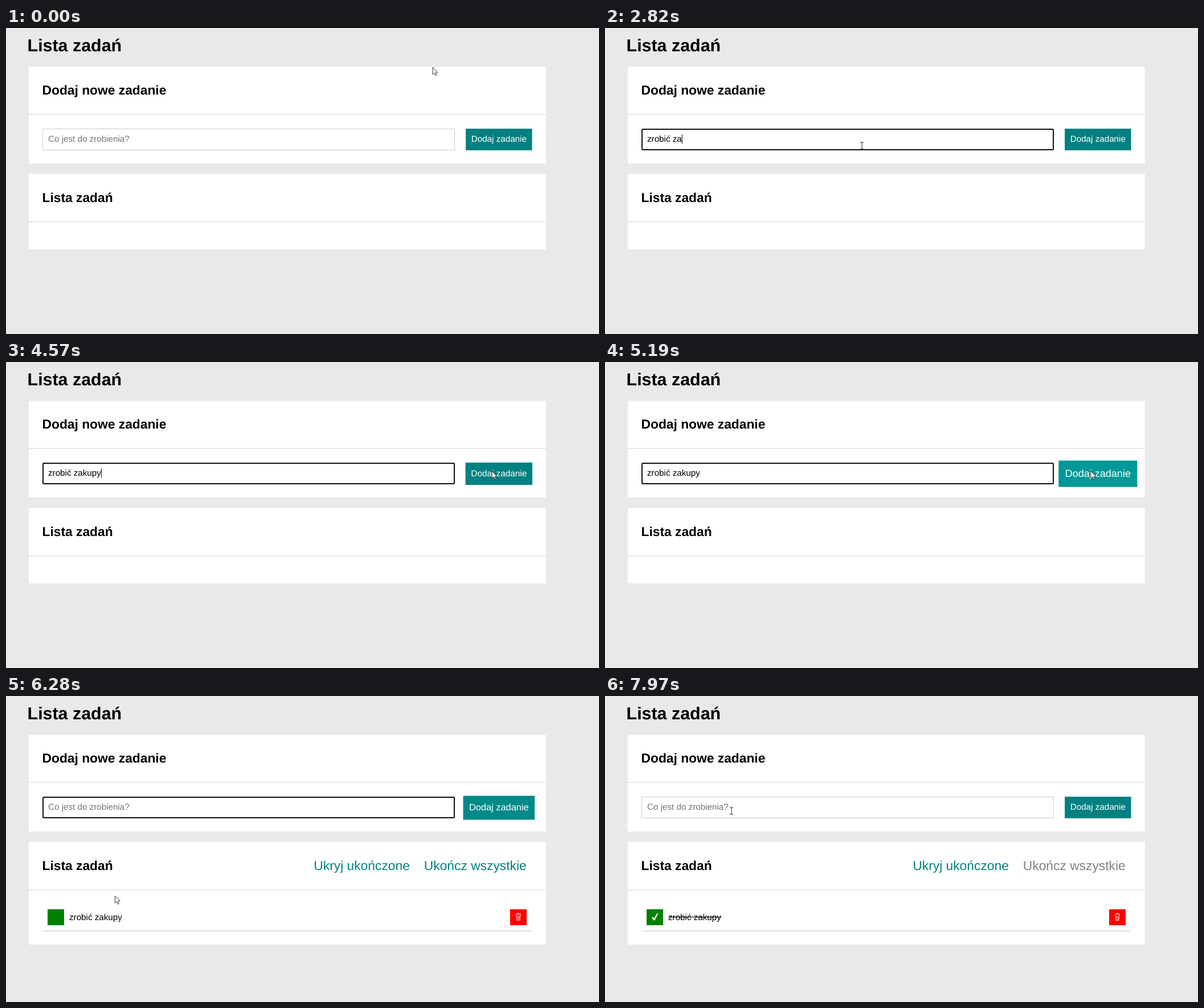
Recreate the animation shown at these times as an HTML page. Size 1041x538 px, loop 8 s.

```html
<!DOCTYPE html>
<html lang="pl">
<head>
<meta charset="utf-8">
<title>Lista zadań</title>
<style>
  html, body { margin: 0; width: 100%; height: 100%; overflow: hidden; background: #e9e9e9; }
  svg { display: block; width: 100%; height: 100%; }
  text { font: 15.2px "Liberation Sans", Arial, sans-serif; text-rendering: geometricPrecision; white-space: pre; }
  .h1 { font-size: 30.4px; font-weight: bold; }
  .h2 { font-size: 22.8px; font-weight: bold; }
  .link { font-size: 22.8px; fill: #008080; }
  .card { fill: #fff; }
  .line { fill: #e6e6e6; }
</style>
</head>
<body>
<svg viewBox="0 0 1041 538">
  <rect width="1041" height="538" fill="#e9e9e9"/>
  <text class="h1" x="37.6" y="41">Lista zadań</text>

  <rect class="card" x="40" y="68.4" width="907.8" height="169.8"/>
  <rect class="line" x="40" y="151" width="907.8" height="1.8"/>
  <text class="h2" x="63.5" y="117">Dodaj nowe zadanie</text>

  <rect id="box" fill="#fff"/>
  <text id="entry" x="74" y="200.2"></text>
  <rect id="caret" y="187" width="1" height="16.4"/>

  <g id="button">
    <rect id="buttonFill" x="-58.2" width="116.4"/>
    <text y="4.3" text-anchor="middle" fill="#fff">Dodaj zadanie</text>
  </g>

  <rect id="listCard" class="card" x="40" y="256.6" width="907.8"/>
  <rect class="line" x="40" y="340" width="907.8" height="1.8"/>
  <text class="h2" x="63.5" y="306">Lista zadań</text>

  <g id="task">
    <text class="link" x="540.3" y="306">Ukryj ukończone</text>
    <text id="finishAll" class="link" x="733.8" y="306">Ukończ wszystkie</text>
    <rect x="64" y="412.2" width="859.5" height="1.8" fill="#ddd"/>
    <rect id="toggle" x="73" y="375" width="29" height="28"/>
    <text x="111" y="393.8">zrobić zakupy</text>
    <g id="done">
      <path d="M82 389.4L84 388.2L86 391L91.4 382.2H93.4L87.4 394.6H85.6Z" fill="#fff"/>
      <rect x="111" y="388.2" width="93" height="1.1"/>
    </g>
    <rect x="885" y="375" width="29" height="28" fill="#f00"/>
    <path d="M895.6 384L896.8 394.5H901.9L903.1 384M898.2 386V393M900.5 386V393M895 383.3H903.8M897.5 382.2H901.2"
      fill="none" stroke="#ffe9e0"/>
  </g>

  <g id="pointer">
    <circle id="halo" r="9" fill="#ff0" fill-opacity=".5"/>
    <path id="arrow" d="M0 0V12.6L2.9 10L5 14.6L6.9 13.7L5 9.2H9Z" fill="#fff" stroke="#222" stroke-width=".9"/>
    <path id="beam" d="M-3 -6H3M0 -6V6M-3 6H3" fill="none" stroke="#222"/>
  </g>
</svg>
<script>
const LOOP = 8000;
const WORD = "zrobić zakupy";
const TYPE_START = 1420, KEY_GAP = 172;

// mouse button goes down on the field, the add button and the task's toggle
const PRESS = { field: 630, add: 5530, toggle: 6760 };
const HOLD = 130;
const ADDED = PRESS.add + HOLD, CHECKED = PRESS.toggle + HOLD;

// each move ends at x, y; bow bends its middle up or down
const REST = { x: 749, y: 69 };
const MOVES = [
  { from: 0, to: 490, x: 351, y: 197, bow: 0 },
  { from: 940, to: 1220, x: 451, y: 207, bow: 0 },
  { from: 4000, to: 4570, x: 853, y: 192, bow: -40 },
  { from: 5800, to: 6420, x: 94, y: 385, bow: -22 },
  { from: 7270, to: 7970, x: 222, y: 202, bow: 40 }
];

const el = {};
document.querySelectorAll("[id]").forEach(node => el[node.id] = node);

const clamp = v => Math.min(1, Math.max(0, v));
const smooth = k => k * k * (3 - 2 * k);
const set = (node, attrs) => { for (const k in attrs) node.setAttribute(k, attrs[k]); };
const show = (node, on) => set(node, { display: on ? "inline" : "none" });

// the CSS "ease" curve, cubic-bezier(.25, .1, .25, 1)
function ease(x) {
  x = clamp(x);
  if (x === 0 || x === 1) return x;
  const bezier = (u, a, b) => 3 * a * u * (1 - u) ** 2 + 3 * b * u * u * (1 - u) + u ** 3;
  let lo = 0, hi = 1;
  for (let i = 0; i < 24; i++) {
    const mid = (lo + hi) / 2;
    if (bezier(mid, .25, .25) < x) lo = mid; else hi = mid;
  }
  return bezier(lo, .1, 1);
}

const hover = (t, enter, leave, span) => ease((t - enter) / span) - ease((t - leave) / span);

function pointerAt(t) {
  let { x, y } = REST;
  for (const m of MOVES) {
    if (t < m.from) break;
    const k = smooth(clamp((t - m.from) / (m.to - m.from)));
    x += (m.x - x) * k;
    y += (m.y - y) * k + m.bow * Math.sin(Math.PI * k);
  }
  return { x, y };
}

function drawInput(t) {
  const focused = (t >= PRESS.field && t < PRESS.add) || (t >= ADDED && t < PRESS.toggle);
  set(el.box, focused
    ? { x: 65, y: 178, width: 722, height: 36, rx: 1.5, stroke: "#101010", "stroke-width": 2 }
    : { x: 64.5, y: 177.5, width: 723, height: 37, rx: 0, stroke: "#ccc", "stroke-width": 1 });

  const keys = Math.min(WORD.length, Math.floor((t - TYPE_START) / KEY_GAP) + 1);
  const typed = keys > 0 && t < ADDED ? WORD.slice(0, keys) : "";
  el.entry.textContent = typed || "Co jest do zrobienia?";
  set(el.entry, { fill: typed ? "#000" : "#757575" });

  // every key press restarts the blink
  const blinkStart = typed ? TYPE_START + (keys - 1) * KEY_GAP : t < ADDED ? PRESS.field : ADDED;
  set(el.caret, { x: 74 + (typed ? el.entry.getComputedTextLength() : 0) });
  show(el.caret, focused && (t - blinkStart) % 1000 < 500);
}

function drawButton(t) {
  const h = hover(t, 4510, 5930, 1000);
  const scale = 1 + .2 * h;
  const c = Math.round(128 * scale);
  // at rest the button snaps to whole pixels
  const height = h > 0 ? 39 : 38;
  set(el.button, { transform: `translate(865.3 ${177 + height / 2}) scale(${scale})` });
  set(el.buttonFill, { y: -height / 2, height, fill: `rgb(0,${c},${c})` });
}

function drawList(t) {
  const checked = t >= CHECKED;
  set(el.listCard, { height: t >= ADDED ? 180.5 : 132.6 });
  show(el.task, t >= ADDED);
  show(el.done, checked);
  el.finishAll.style.fill = checked ? "#808080" : "#008080";
  const green = Math.round(128 * (1 + .48 * hover(t, 6370, 7350, 500)));
  set(el.toggle, { fill: `rgb(0,${green},0)` });
}

function drawPointer(t) {
  const { x, y } = pointerAt(t);
  const inside = (left, top, right, bottom) => x > left && x < right && y > top && y < bottom;
  const overText = inside(64, 177, 788, 215) || inside(64, 286, 187, 312);
  set(el.pointer, { transform: `translate(${x} ${y})` });
  show(el.arrow, !overText);
  show(el.beam, overText);
  show(el.halo, Object.values(PRESS).some(p => t >= p && t < p + HOLD));
}

const start = performance.now();
function draw(now) {
  const t = Math.max(0, now - start) % LOOP;
  drawInput(t);
  drawButton(t);
  drawList(t);
  drawPointer(t);
  requestAnimationFrame(draw);
}
draw(start);
</script>
</body>
</html>
```
